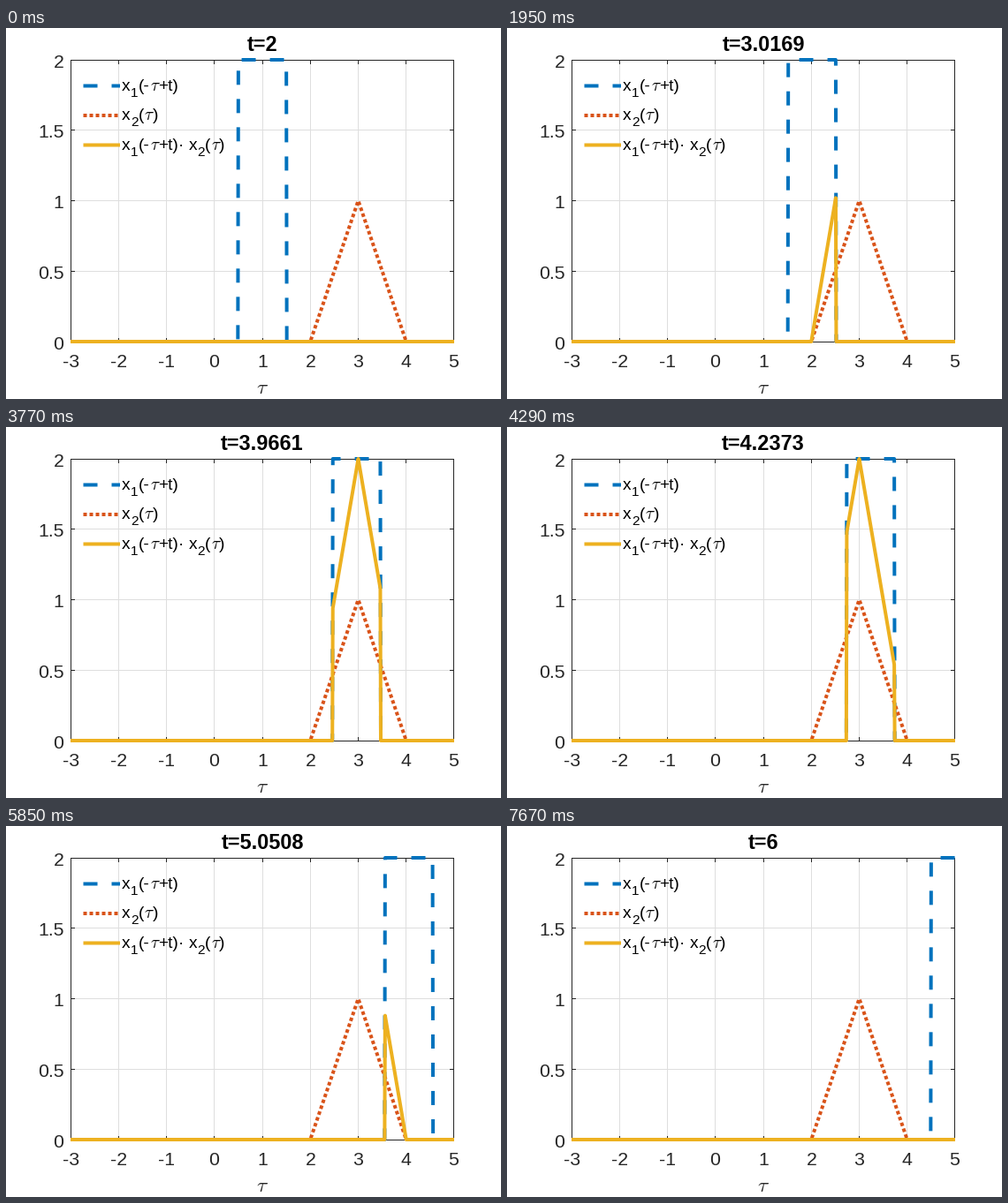
These frames come from a looping animation (560 by 420 pixels, 7800 ms). A matplotlib script:

```python
import numpy as np
import matplotlib.pyplot as plt
from matplotlib.animation import FuncAnimation

WIDTH, HEIGHT, DPI = 560, 420, 100
FRAMES, INTERVAL = 60, 130
PT = 72 / DPI  # points per pixel
BLUE, ORANGE, YELLOW = (0, .447, .741), (.85, .325, .098), (.929, .694, .125)
INK, GRID = (.15, .15, .15), (.8725, .8725, .8725)
LEFT, RIGHT, TOP, BOTTOM = 73.5, 506.5, 36.5, 355.5
DASHED, DOTTED = (0, (4, 4)), (0, (1, .75))

plt.rcParams.update({
    "font.family": "Liberation Sans",
    "mathtext.fontset": "cm",
    "path.simplify": False,
    "path.snap": False,
    "lines.scale_dashes": True,
})

fig = plt.figure(figsize=(WIDTH / DPI, HEIGHT / DPI), dpi=DPI, facecolor="white")
ax = fig.add_axes([0, 0, 1, 1])
ax.set(xlim=(0, WIDTH), ylim=(HEIGHT, 0))
ax.axis("off")


def to_x(tau):
    return 73 + 54.25 * (tau + 3)


def to_y(value):
    return 355 - 159.5 * value


def pixel_centre(position):
    return np.floor(position) + .5


def hairline(xs, ys, color=INK):
    ax.plot(xs, ys, color=color, lw=PT, solid_capstyle="projecting",
            solid_joinstyle="miter", snap=False)


def curve(xs, ys, color, style="-"):
    return ax.plot(xs, ys, color=color, lw=4 * PT, ls=style, snap=False,
                   solid_capstyle="butt", dash_capstyle="butt",
                   solid_joinstyle="round", dash_joinstyle="round")[0]


def label(x, y, text, size, color=INK, ha="center", **kw):
    return ax.text(x, y, text, fontsize=size * PT, color=color, ha=ha,
                   va="baseline", **kw)


def draw_axes():
    ticks = []
    for tau, x in zip(range(-3, 6), pixel_centre(np.linspace(LEFT, RIGHT, 9))):
        ticks += [([x, x], [BOTTOM, BOTTOM - 4]), ([x, x], [TOP, TOP + 4])]
        hairline([x, x], [TOP, BOTTOM], GRID)
        label(x, 384, str(tau), 21.33)
    for value in np.arange(0, 2.1, .5):
        y = pixel_centre(to_y(value))
        ticks += [([LEFT, LEFT + 4], [y, y]), ([RIGHT, RIGHT - 4], [y, y])]
        hairline([LEFT, RIGHT], [y, y], GRID)
        label(65.5, y + 8.5, f"{value:g}", 21.33, ha="right")
    for xs, ys in ticks:
        hairline(xs, ys)
    hairline([LEFT, RIGHT, RIGHT, LEFT, LEFT], [TOP, TOP, BOTTOM, BOTTOM, TOP])
    label(290, 414, r"$\tau$", 23.47)


def legend_text(x, y, parts):
    """Each part is (offset, text); a leading underscore marks a subscript."""
    for offset, text in parts:
        sub = text.startswith("_")
        label(x + offset, y + 7 * sub, text.lstrip("_"), 15.4 if sub else 19.2,
              "black", ha="left")


def draw_legend():
    tau = r"$\tau$"
    first = [(0, "x"), (9.8, "_1"), (18.8, "(-"), (31.8, tau), (41, "+t)")]
    second = [(0, "x"), (9.8, "_2"), (18.8, "("), (25.3, tau), (34.8, ")")]
    product = first + [(64, "·")] + [(75.3 + dx, s) for dx, s in second]
    rows = [(65.5, BLUE, DASHED, first), (99, ORANGE, DOTTED, second),
            (132.5, YELLOW, "-", product)]
    for y, color, style, parts in rows:
        curve([87.5, 129], [y, y], color, style)
        legend_text(131, y + 5.3, parts)


tau = np.round(np.linspace(-3, 5, 801), 2)
triangle = np.maximum(0, 1 - abs(tau - 3))

draw_axes()
pulse_line = curve(to_x(tau), to_y(0 * tau), BLUE, DASHED)
curve(to_x(tau), to_y(triangle), ORANGE, DOTTED)
product_line = curve(to_x(tau), to_y(0 * tau), YELLOW)
draw_legend()
title = label(290, 26, "", 23.47, "black", weight="bold")


def update(frame):
    t = 2 + 4 * frame / (FRAMES - 1)
    pulse = 2 * (abs(tau - (t - 1)) <= .5 + 1e-9)
    pulse_line.set_ydata(to_y(pulse))
    product_line.set_ydata(to_y(pulse * triangle))
    title.set_text(f"t={t:.5g}")
    return pulse_line, product_line, title


anim = FuncAnimation(fig, update, frames=FRAMES, interval=INTERVAL,
                     repeat=True, repeat_delay=0)
plt.show()
```
